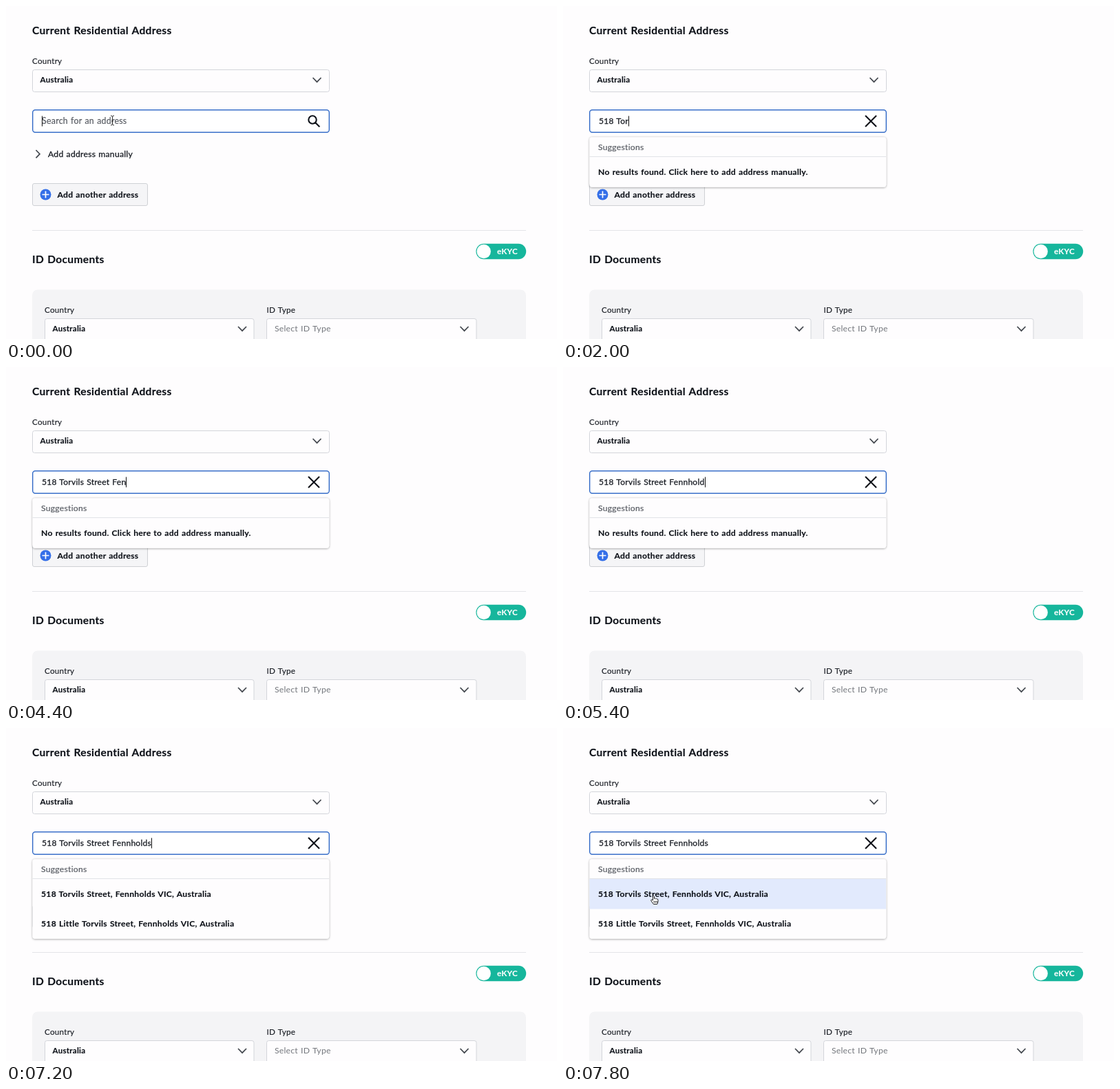
An HTML page for the animation above (8 s loop, 800x483 px).

```html
<!DOCTYPE html>
<html lang="en">
<head>
<meta charset="utf-8">
<title>Address search</title>
<style>
  html, body { margin: 0; width: 100%; height: 100%; overflow: hidden; background: #fefdfe; }
  svg { display: block; }
  text {
    font: 12.2px Lato, "Open Sans", sans-serif; letter-spacing: .02em; word-spacing: .06em;
    fill: #1b1f26; white-space: pre;
  }
  .bold { font-weight: 700; fill: #0d1118; stroke: #0d1118; stroke-width: .12; }
  .title { font-size: 15.6px; }
  .label { font-size: 11.7px; stroke: #1b1f26; stroke-width: .15; }
  .value { font-size: 11.6px; }
  .medium { stroke: #1b1f26; stroke-width: .3; }
  .hint { fill: #585c63; stroke: #585c63; stroke-width: .2; }
  .pale { fill: #74777d; }
  .field { fill: #fefdfe; stroke: #d3d5da; }
  .icon { fill: none; stroke: #0d1118; stroke-width: 2.1; }
  .chevron { fill: none; stroke: #44484f; stroke-width: 1.7; }
  .pointer { fill: #fff; stroke: #222; stroke-linejoin: round; }
</style>
</head>
<body>
<svg width="800" height="483" viewBox="0 0 800 483">
  <defs>
    <path id="down" class="chevron" d="M-6-3 0 3.2 6-3"/>
    <filter id="shadow" x="-5%" y="-20%" width="110%" height="150%">
      <feDropShadow dx="0" dy=".6" stdDeviation="1.8" flood-color="#000" flood-opacity=".42"/>
    </filter>
  </defs>

  <text class="bold title" x="38" y="41.3">Current Residential Address</text>
  <text class="label" x="38" y="83.8">Country</text>
  <rect class="field" x="38.5" y="92.5" width="431" height="32" rx="3"/>
  <text class="bold value" x="49.5" y="111.3">Australia</text>
  <use href="#down" x="451.5" y="107"/>

  <rect x="38.7" y="150.7" width="430.6" height="32.6" rx="4" fill="#fff" stroke="#3a70c9" stroke-width="1.5"/>
  <text id="hint" class="hint" x="52" y="170.9" style="font-size:12.4px">Search for an address</text>
  <text id="typed" class="medium" x="52" y="170.9" style="font-size:12.05px"></text>
  <path id="caret" d="M.5 159.5v15" stroke="#111"/>
  <path id="lens" class="icon" d="M450.7 165a5.7 5.7 0 1 0-11.4 0a5.7 5.7 0 1 0 11.4 0M449 169l6.3 6.3"/>
  <path id="cross" class="icon" d="M439 159l16 16m0-16l-16 16"/>

  <path class="chevron" d="M43.5 209l5.5 5.7-5.5 5.7"/>
  <text class="medium" x="61" y="218.5">Add address manually</text>
  <rect x="38.5" y="257.5" width="167" height="32" rx="2.5" fill="#f5f5f7" stroke="#cfd1d5"/>
  <circle cx="57.5" cy="273.5" r="8" fill="#346fe8"/>
  <path d="M52.5 273.5h10m-5-5v10" stroke="#fff" stroke-width="1.7"/>
  <text class="bold" x="74.5" y="277.8">Add another address</text>

  <path d="M38 325.5h717" stroke="#e3e4e8"/>
  <text class="bold title" x="38" y="373">ID Documents</text>
  <rect x="682.4" y="344.8" width="72.8" height="22.5" rx="11.25" fill="#16b69c"/>
  <circle cx="693.7" cy="356" r="10.2" fill="#fff"/>
  <text class="bold" x="713" y="360.1" style="font-size:11.7px;fill:#fff;stroke:#fff">eKYC</text>

  <rect x="38" y="411.5" width="717" height="90" rx="8" fill="#f4f4f6"/>
  <text class="label" x="56" y="444.8">Country</text>
  <text class="label" x="378.5" y="444.8">ID Type</text>
  <rect class="field" x="56.5" y="453.5" width="303.5" height="40" rx="3"/>
  <rect class="field" x="378.5" y="453.5" width="304.5" height="40" rx="3"/>
  <text class="bold value" x="67.5" y="472.3">Australia</text>
  <text class="pale" x="390" y="472.3">Select ID Type</text>
  <use href="#down" x="343" y="468"/>
  <use href="#down" x="665.5" y="468"/>

  <g id="panel">
    <rect id="sheet" x="38.5" y="190.3" width="430.7" rx="4" fill="#fefdfe" filter="url(#shadow)"/>
    <rect id="hover" x="38.5" y="219" width="430.5" height="43.5" fill="#e2eafd"/>
    <path d="M38.5 218.5h430.5" stroke="#e2e3e7"/>
    <text class="hint" x="51" y="208.5">Suggestions</text>
    <text id="first" class="bold" x="51" y="244.6"></text>
    <text id="second" class="bold" x="51" y="287.9"></text>
  </g>

  <path id="beam" fill="none" stroke="#333" d="M-2.5-7q2.5 0 2.5 2V5q0 2-2.5 2M2.5-7q-2.5 0-2.5 2V5q0 2 2.5 2M-1.5 1h3"/>
  <path id="hand" class="pointer" d="M-2.5 1V-5q1-1.8 2 0v3.5q1-1.3 2 .3q1-1 1.8.3q1.7-.6 1.7 1.4V3L3.8 6.5H-1.6L-5.2 1.5q-.2-2 1.4-1.3ZM-.8 2v2.5M1.2 2v2.5M3.2 2v2.5"/>
</svg>
<script>
const LOOP = 8000, STEP = 200;
const OPEN = 1000, FOUND = 6800, MOVE = 7300, REST = 7800;
const query = "518 Torvils Street Fennholds";
const keys = [[800, 0], [1000, 1], [3200, 14], [4400, 22], [5600, 28]];
const results = [
  "518 Torvils Street, Fennholds VIC, Australia",
  "518 Little Torvils Street, Fennholds VIC, Australia"
];
const el = id => document.getElementById(id);
const show = (id, on) => el(id).setAttribute("visibility", on ? "visible" : "hidden");
const within = (t, from, to) => t >= from && t < to;

function typedCount(t) {
  for (let i = 1; i < keys.length; i++) {
    const [t0, n0] = keys[i - 1], [t1, n1] = keys[i];
    if (t <= t1) return Math.max(0, Math.round(n0 + (n1 - n0) * (t - t0) / (t1 - t0)));
  }
  return query.length;
}

function draw(t) {
  const open = t >= OPEN, found = t >= FOUND;
  const typed = el("typed");
  typed.textContent = query.slice(0, typedCount(t));
  const end = open ? 52 + typed.getComputedTextLength() : 52;
  el("caret").setAttribute("transform", `translate(${Math.round(end)} 0)`);
  show("caret", !within(t, 400, 1000) && !within(t, 6200, 6800) && t < 7400);
  show("hint", !open);
  show("lens", !open);
  show("cross", open);

  el("panel").style.display = open ? "" : "none";
  el("sheet").setAttribute("height", found ? 115.5 : 72.5);
  el("first").textContent = found ? results[0] : "No results found. Click here to add address manually.";
  el("second").textContent = found ? results[1] : "";

  // The pointer hides while typing, then glides down to the first result.
  const p = Math.min(1, Math.max(0, (t - MOVE) / (REST - MOVE)));
  const ease = p * p * (3 - 2 * p);
  const x = 154.5 - 21.5 * ease, y = 166 + 83 * ease;
  const hovering = y > 219;
  for (const id of ["beam", "hand"]) el(id).setAttribute("transform", `translate(${x} ${y})`);
  show("beam", !open || (t > MOVE && !hovering));
  show("hand", hovering);
  show("hover", hovering);
}

const start = performance.now();
function tick() {
  const t = (performance.now() - start) % LOOP;
  draw(Math.floor(t / STEP) * STEP);
  requestAnimationFrame(tick);
}
tick();
</script>
</body>
</html>
```
